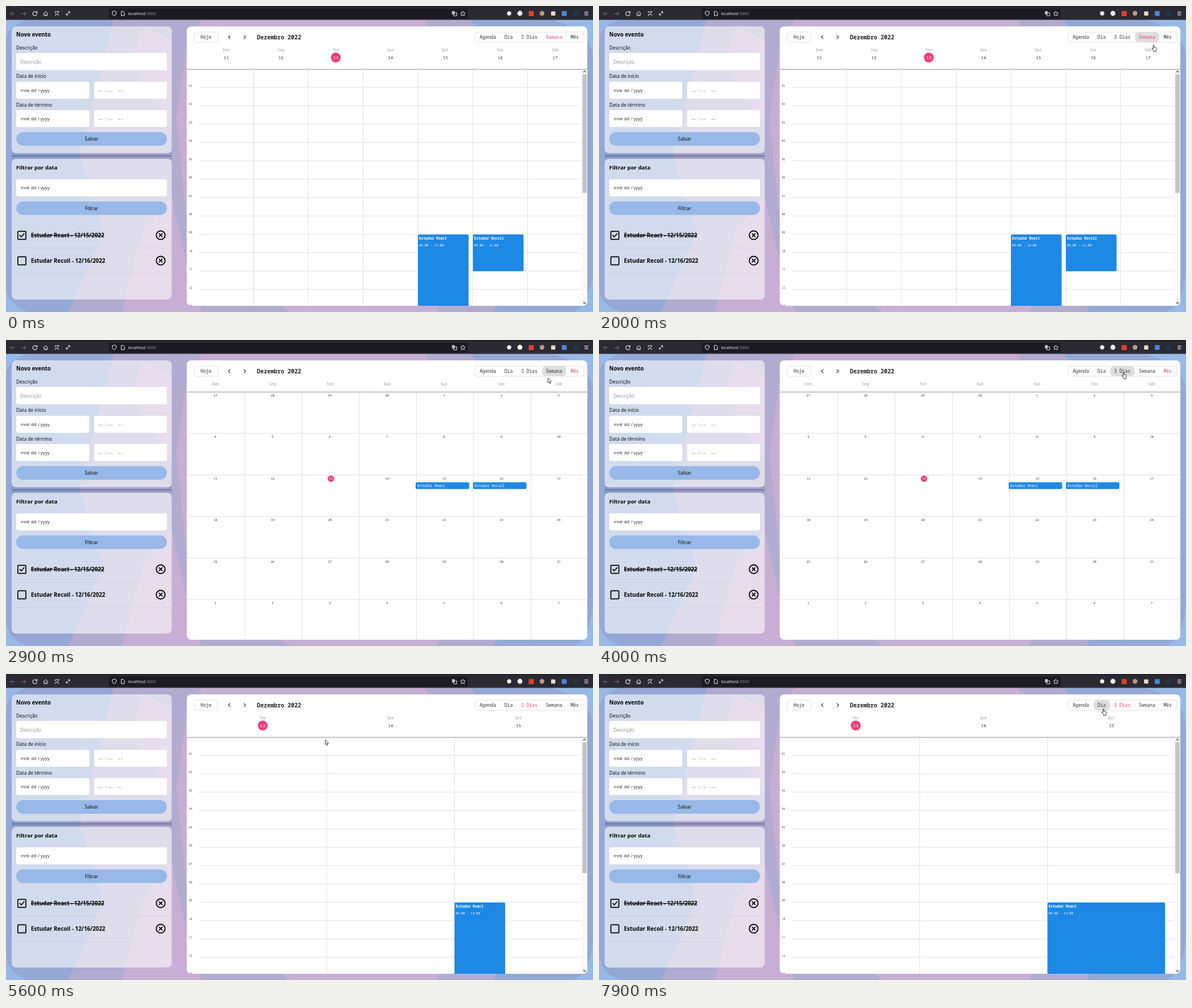
Write an HTML page that moves like this. It is 1036 px wide and 541 px high and loops after 8000 ms.

```html
<!DOCTYPE html>
<html lang="pt-BR">
<head>
<meta charset="utf-8">
<title>Agenda</title>
<style>
  html, body { margin: 0; width: 100%; height: 100%; overflow: hidden; background: #98b9e8; }
  svg { display: block; width: 100vw; height: 100vh; }
  text { font-family: "Open Sans", "Noto Sans", sans-serif; white-space: pre; }
  .mono { font-family: "Noto Sans Mono", "DejaVu Sans Mono", monospace; }
</style>
</head>
<body>
<svg id="stage" viewBox="0 0 1036 541" preserveAspectRatio="none"></svg>
<script>
const PINK = '#ec407a', BLUE = '#1e88e5', GRID = '#e0e0e0';

// ---- drawing helpers ----
const rect = (x, y, w, h, fill, r = 0, more = '') =>
  `<rect x="${x}" y="${y}" width="${w}" height="${h}" rx="${r}" fill="${fill}" ${more}/>`;
const line = (d, stroke = GRID, w = 1, more = '') =>
  `<path d="${d}" fill="none" stroke="${stroke}" stroke-width="${w}" ${more}/>`;
const shape = (d, fill) => `<path d="${d}" fill="${fill}"/>`;
const dot = (x, y, r, fill, more = '') => `<circle cx="${x}" cy="${y}" r="${r}" fill="${fill}" ${more}/>`;
// y is the middle of the capitals
const text = (x, y, str, size, fill = '#000', more = '') =>
  `<text x="${x}" y="${(y + size * .36).toFixed(2)}" font-size="${size}" fill="${fill}" ${more}>${str}</text>`;
const MID = 'text-anchor="middle"', BOLD = 'font-weight="700"';
const mono = (x, y, str, size, fill, more = '') => text(x, y, str, size, fill, 'class="mono" ' + more);
const times = (n, fn) => Array.from({ length: n }, (_, i) => fn(i)).join('');
const group = (id, body, more = '') => `<g id="${id}" ${more}>${body}</g>`;

function backdrop() {
  return rect(0, 0, 1036, 541, '#98b9e8') +
    shape('M0 62Q2 34 40 24H960Q1032 40 1036 90V470Q1030 528 1002 541H40Q6 532 0 500Z', '#93a8d5') +
    shape('M190 24H820L1000 280 860 541H110L172 400 130 265Z', '#b2abd0') +
    shape('M345 24L318 78 301 200 318 372 330 420 500 541H760L840 300 740 24Z', '#c6aed5') +
    shape('M240 400L292 335 318 450 345 541H205Z', '#c6aed5') +
    shape('M222 100L240 36 292 60V215Z', '#c6aed5');
}

function browser() {
  const ic = '#f3f3f5', dim = '#77767f';
  return rect(0, 0, 1036, 24.5, '#2b2a33') + rect(36, 0, 1000, 1.5, '#1c1b22') +
    line('M16 13.5H8M11.5 10L8 13.5 11.5 17', dim) +
    line('M27 13.5H35M31.5 10L35 13.5 31.5 17', dim) +
    line('M54 11.2A3.8 3.8 0 1 0 54.8 14M54.8 9V12H51.8', ic, 1.1) +
    line('M66.2 13.2L70 9.8 73.8 13.2M67.2 12.8V17H72.8V12.8M70 17V14.5', ic) +
    line('M87 10H94M87 10V13M94 10L87 17M90 14L94 17M86.5 15.5H88.5', ic) +
    line('M106.5 16L112.5 10M109.5 10H112.5V13M106.5 13V16H109.5', ic) +
    rect(182, 4.5, 633, 18, '#1c1b22', 2.5) +
    line('M191 9L194.5 10.2V13Q194 16 191 17.5 188 16 187.5 13V10.2Z', ic) +
    line('M203.5 9.5H207L209 11.5V17H203.5Z', ic) +
    text(215.5, 13.7, 'localhost<tspan fill="#96959f">:3000</tspan>', 7.3, '#fbfbfe') +
    rect(787, 9, 5, 6, '#b9b9bf', 1) + line('M791 12H795.5V17.5H790V15', ic, .9) +
    line('M806.3 9L807.6 11.8 810.6 12.2 808.4 14.3 809 17.3 806.3 15.8 803.6 17.3 804.2 14.3 802 12.2 805 11.8Z', ic, .9) +
    dot(888, 13, 3.7, ic) + dot(907, 13, 4.4, '#fff') + rect(922.5, 9, 9, 9, '#e0402f', 1) +
    dot(946, 13, 4.2, '#b99b85') + rect(962, 9.5, 7.5, 7.5, '#ecd6cf', 1) +
    rect(981, 9, 8.5, 8.5, '#4a86e0', 1) + rect(1001, 9, 8, 8, '#1d3a4a', 1) +
    line('M1021 10.5H1027.5M1021 13.2H1027.5M1021 15.9H1027.5', ic, 1);
}

function dateField(x, y, w) {
  const parts = [['mm', 0], ['/', 12], ['dd', 18], ['/', 30.5], ['yyyy', 35]];
  return rect(x, y, w, 30, '#fff', 3) +
    parts.map(([s, dx]) => text(x + 8 + dx, y + 15, s, 7.9, '#222')).join('');
}
function timeField(x, y) {
  const parts = [['--', 8], [':', 20], ['--', 25.5], ['--', 43]];
  return rect(x, y, 128.5, 30, '#fff', 3) +
    parts.map(([s, dx]) => text(x + dx, y + 15, s, 8, '#222', 'letter-spacing="1.8"')).join('');
}
const button = (y, label) =>
  rect(18, y, 266, 24, '#97b8e8', 12) + text(151, y + 12.3, label, 8.5, '#000', MID);

function task(y, label, done) {
  return rect(20.9, y - 6.6, 14.2, 14.2, 'none', 1, 'stroke="#000" stroke-width="1.7"') +
    (done ? line(`M24 ${y}L27 ${y + 3.2} 32.4 ${y - 3}`, '#000', 1.7) +
      line(`M44 ${y + .6}H173`, '#000', 1) : '') +
    text(44, y + .5, label, 9.85, '#000', BOLD) +
    dot(273, y + .2, 7.7, 'none', 'stroke="#000" stroke-width="1.8"') +
    line(`M270 ${y - 2.8}l6 6m0 -6l-6 6`, '#000', 1.8) +
    line(`M10 ${y + 23}H292.5`, '#8899bb', .6, 'opacity=".25"');
}

function sidebar() {
  const glass = '#ffffff96';
  return rect(10, 259, 282.5, 12, '#5c6f9c', 0, 'opacity=".22"') +
    rect(10, 36, 282.5, 224.5, glass, 8) + rect(10, 270, 282.5, 249, glass, 8) +
    line('M10 265H292.5', '#55556a', 1) +
    text(18, 51, 'Novo evento', 9.7, '#000', BOLD) +
    text(18, 74, 'Descrição', 8.35) + rect(18, 83, 266, 30.5, '#fff', 3) +
    text(25, 98.7, 'Descrição', 8.2, '#8c8c8c') +
    text(18, 124.3, 'Data de início', 8.35) + dateField(18, 134, 129) + timeField(155.5, 134) +
    text(18, 174.5, 'Data de término', 8.35) + dateField(18, 184, 129) + timeField(155.5, 184) +
    button(223, 'Salvar') +
    text(18, 286, 'Filtrar por data', 9.6, '#000', BOLD) + dateField(18, 306.5, 266) +
    button(345.5, 'Filtrar') +
    task(405, 'Estudar React - 12/15/2022', true) + task(450, 'Estudar Recoil - 12/16/2022', false);
}

// label, centre, hover box left and width
const TABS = [['Agenda', 850.5, 829, 43], ['Dia', 887, 873, 29], ['3 Dias', 923.5, 902, 43.5],
  ['Semana', 967.2, 946, 43], ['Mês', 1003.7, 989, 29]];
const DAYS = ['Dom', 'Seg', 'Ter', 'Qua', 'Qui', 'Sex', 'Sab'];

function toolbar() {
  const frame = `stroke="${GRID}"`;
  return rect(332, 46, 42, 18, '#fff', 4, frame) + mono(353, 55.3, 'Hoje', 8.1, '#333', MID) +
    line('M395.8 52L392.6 55 395.8 58.2M419.8 52L423 55 419.8 58.2', '#444', 1.3) +
    mono(443, 55, 'Dezembro 2022', 10, '#222', BOLD) +
    rect(828, 46, 192, 18, '#fff', 4, frame) + rect(0, 46, 0, 18, '#dedede', 7, 'id="hover"') +
    TABS.map(([s, x], i) => mono(x, 55.3, s, 8.1, '#333', `${MID} id="tab${i}"`)).join('');
}

const timedEvent = (x, h, title, span, id = '') =>
  rect(x, 404, 89.5, h, BLUE, 2.5, id) + mono(x + 2, 411, title, 6.3, '#fff', BOLD) +
  mono(x + 2, 422.8, span, 5.55, '#fff');

function dayColumns(first, count, thumbEnd) {
  const w = 677 / count;
  return times(count, i => {
    const x = 340.3 + w * (i + .5), day = 11 + first + i, today = day === 13;
    return mono(x, 77.7, DAYS[first + i], 6.6, '#999', MID) +
      (today ? dot(x, 91, 8.7, PINK) : '') +
      mono(x, 91, day, 7.6, today ? '#fff' : '#333', MID) +
      (i ? line(`M${340.3 + w * i} 113V530`) : '');
  }) +
    line('M319 112H1026', '#c4c4c4', 2) +
    times(13, i => {
      const y = 144 + 32.45 * i;
      return line(`M340 ${y}H1016`) + mono(323, y - 2.8, String(i + 1).padStart(2, '0'), 4.5, '#444');
    }) +
    rect(1016.5, 113, 9.5, 417, '#f8f8f8') + rect(1017, 121, 8, thumbEnd - 121, '#c6c6c6') +
    line('M1018.6 117.3L1021 114.9 1023.4 117.3M1018.6 523.7L1021 526.1 1023.4 523.7', '#444', 1.2);
}

function month() {
  const col = i => 369.5 + 101 * i, row = i => 91.5 + 73.5 * i;
  const chip = (x, s) => rect(x, 251.5, 94.5, 12, BLUE, 2.5) + mono(x + 3, 257.6, s, 6.3, '#fff');
  return times(7, i => mono(col(i), 77.7, DAYS[i], 6.6, '#999', MID) +
      (i ? line(`M${col(i) - 49} 92V530`) : '')) +
    times(5, i => line(`M319 ${row(i + 1)}H1026`)) +
    line('M320 92H1025', '#c4c4c4', 2) +
    times(42, i => {
      const x = col(i % 7), y = row(Math.floor(i / 7)) + 6.2, today = i === 16;
      return (today ? dot(x + 2, y + .5, 5.6, PINK) : '') +
        mono(x + (today ? 2 : 0), y, new Date(2022, 10, 27 + i).getDate(), 5.5, today ? '#fff' : '#333', MID);
    }) + chip(723, 'Estudar React') + chip(824, 'Estudar Recoil');
}

const week = () => dayColumns(0, 7, 330.5) +
  timedEvent(727, 130, 'Estudar React', '09:00 - 13:00') +
  timedEvent(824, 65, 'Estudar Recoil', '09:00 - 11:00');
const threeDays = () => dayColumns(2, 3, 352) +
  timedEvent(791.5, 130, 'Estudar React', '09:00 - 13:00', 'id="wide"');

const cursors =
  group('arrow', '<path d="M.5 .5V9.2L2.4 7.5 3.8 10.6 5.2 10 3.8 7H6.4Z" fill="#fff" stroke="#222" stroke-width=".8"/>') +
  group('hand', '<path d="M3 7.6V1.6Q3.8 .2 4.6 1.6V5L8.2 5.8Q9.2 6.2 9 7.6L8.2 10.4V12.6H4V11.2L.7 7.6Q1 6.2 2.2 7Z" fill="#fff" stroke="#222" stroke-width=".9"/>');

document.getElementById('stage').innerHTML =
  `<clipPath id="card">${rect(319, 36, 707, 494, '#fff', 8)}</clipPath>` +
  backdrop() + browser() + sidebar() +
  group('calendar', rect(319, 36, 707, 494, '#fff') + toolbar() +
    group('week', week()) + group('month', month()) + group('three', threeDays()),
    'clip-path="url(#card)"') + cursors;

// ---- timeline, in ticks of 100 ms ----
const PATH = [[0, 10, -8.5], [1, 58, -5], [3, 200, 8], [5, 769, 25], [7, 880, 45], [8, 1011, 67],
  [10, 1003, 63], [12, 992, 57], [14, 991, 56.5], [17, 988, 57], [18, 986, 58], [20, 975, 68],
  [22, 972, 69], [25, 956, 66.5], [30, 956, 66.5], [32, 945, 78], [33, 928, 83], [35, 910, 67],
  [37, 912, 62], [40, 922, 56], [52, 922, 56], [53, 880, 62], [56, 563, 115.5], [58, 612, 109],
  [60, 650, 130], [62, 742, 166], [63, 864, 213], [65, 879, 240], [67, 850, 325], [68, 800, 337],
  [70, 664, 310], [71, 685, 286], [73, 720, 250], [76, 870, 110], [77, 889, 64], [79, 886.5, 60.5]];
const STILL = [2, 6, 9, 13, 15, 16, 19, 21, 26, 31, 36, 59, 64, 72, 78];
// [first tick, value]
const VIEW = [[0, 'week'], [22, 'month'], [53, 'three']];
const HOVER = [[0, -1], [10, 4], [20, 3], [30, -1], [37, 2], [53, -1], [79, 1]];
const HAND = [[0, false], [10, true], [23, false], [37, true], [53, false], [79, true]];
const ACTIVE = { week: 3, month: 4, three: 2 };

const at = (steps, k) => steps.filter(s => s[0] <= k).pop()[1];
const $ = id => document.getElementById(id);
const show = (id, on) => $(id).setAttribute('display', on ? 'inline' : 'none');

function cursorAt(k) {
  const i = PATH.findIndex(p => p[0] > k);
  if (i < 0) return PATH[PATH.length - 1].slice(1);
  const [t0, x0, y0] = PATH[i - 1], [t1, x1, y1] = PATH[i], u = (k - t0) / (t1 - t0);
  return [x0 + (x1 - x0) * u, y0 + (y1 - y0) * u];
}

function draw(ms) {
  let k = Math.floor(ms / 100);
  while (STILL.includes(k)) k--;
  const view = at(VIEW, k), hover = at(HOVER, k), hand = at(HAND, k), [x, y] = cursorAt(k);
  for (const id in ACTIVE) show(id, id === view);
  TABS.forEach((_, i) => $('tab' + i).setAttribute('fill', i === ACTIVE[view] ? PINK : '#333'));
  show('hover', hover >= 0);
  if (hover >= 0) {
    $('hover').setAttribute('x', TABS[hover][2]);
    $('hover').setAttribute('width', TABS[hover][3]);
  }
  $('wide').setAttribute('width', k < 58 ? 89.5 : 207.5);
  show('hand', hand);
  show('arrow', !hand);
  $(hand ? 'hand' : 'arrow').setAttribute('transform', `translate(${x} ${y})`);
}

const start = performance.now();
(function loop() {
  draw((performance.now() - start) % 8000);
  requestAnimationFrame(loop);
})();
</script>
</body>
</html>
```
